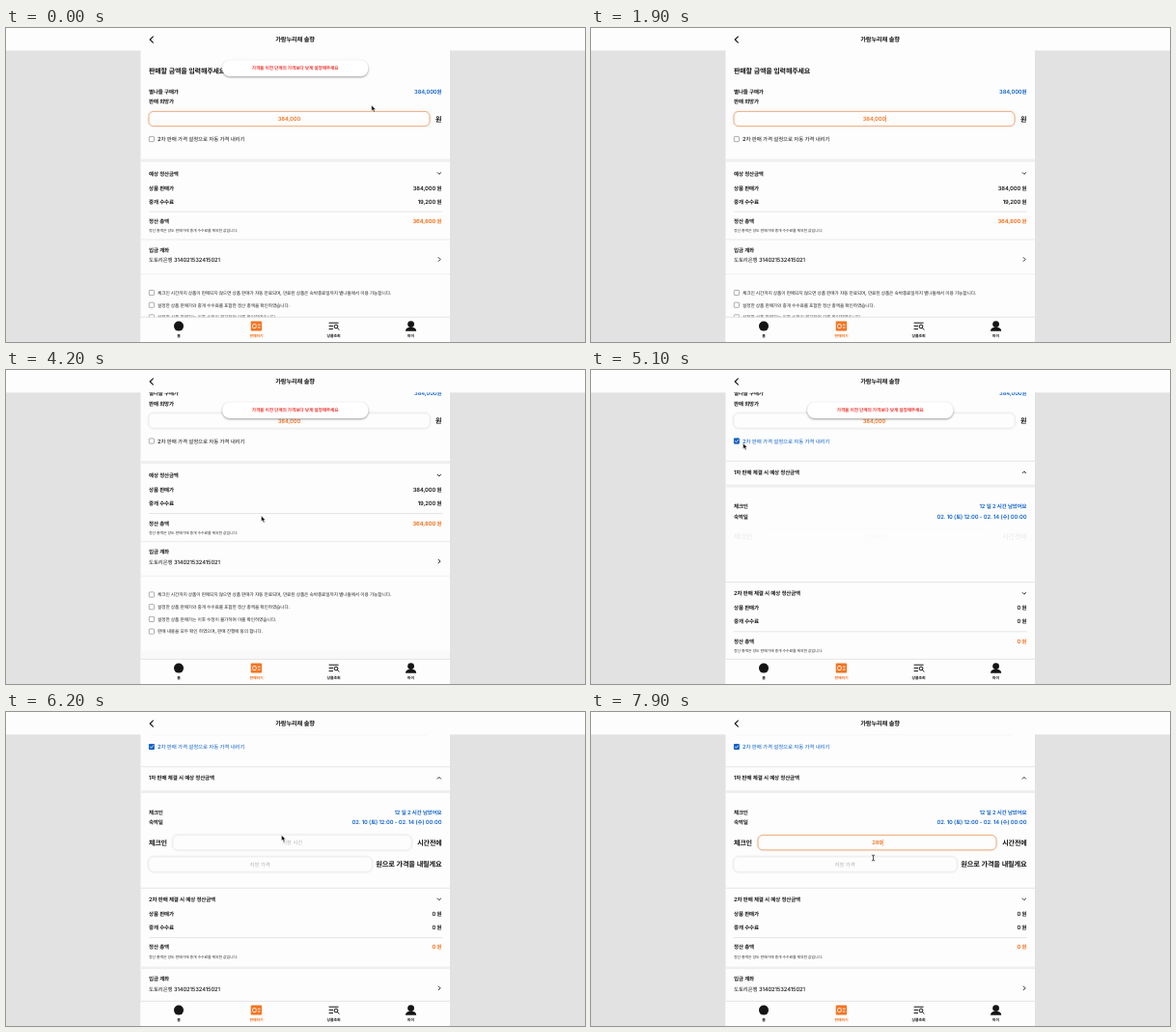
These frames come from a looping animation (600x325 px, 8 s). An HTML page:

```html
<!DOCTYPE html>
<html lang="ko">
<head>
<meta charset="utf-8">
<title>판매 금액 입력</title>
<style>
  html, body { margin: 0; width: 100%; height: 100%; overflow: hidden; background: #e2e2e2; }
  svg { display: block; width: 100vw; height: 100vh; }
  text {
    font-family: Inter, "Noto Sans CJK KR", "Noto Sans CJK", sans-serif;
    letter-spacing: -.02em; text-rendering: geometricPrecision; white-space: pre;
  }
  .ko { font-family: "Noto Sans CJK KR", "Noto Sans CJK", sans-serif; font-size: .94em; letter-spacing: -.026em; }
  .field { filter: drop-shadow(0 .5px 1px rgba(0, 0, 0, .13)); }
  .toast { filter: drop-shadow(.6px 1px 1.3px rgba(0, 0, 0, .38)); }
</style>
</head>
<body>
<svg id="stage" viewBox="0 0 600 325"></svg>
<script>
const LOOP = 8000;
const INK = '#151515', BLUE = '#0f62c8', ORANGE = '#f47421', PAPER = '#fdfdfd', HINT = '#b4b4b4';

// ---------- drawing helpers ----------
const text = (str, x, y, { size = 14, weight = 600, fill = INK, anchor = 'start', id = '' } = {}) => {
  const px = size * 5 / 12;
  const runs = str.replace(/[가-힣]+/g, run => `<tspan class="ko">${run}</tspan>`);
  return `<text id="${id}" x="${x}" y="${y + px * .36}" font-size="${px}" font-weight="${weight}"
    fill="${fill}" text-anchor="${anchor}">${runs}</text>`;
};
const right = (str, y, options) => text(str, 451.5, y, { anchor: 'end', ...options });
const center = (str, x, y, options) => text(str, x, y, { anchor: 'middle', ...options });
const rect = (x, y, w, h, fill, extra = '') =>
  `<rect x="${x}" y="${y}" width="${w}" height="${h}" fill="${fill}" ${extra}/>`;
const band = (y, h, fill = '#efefef') => rect(139.5, y, 320.5, h, fill);
const stroke = (d, width = 1, color = INK) =>
  `<path d="${d}" fill="none" stroke="${color}" stroke-width="${width}" stroke-linecap="round" stroke-linejoin="round"/>`;
const chevron = (y, flip = 1) => stroke(`M447.2 ${y - .8 * flip}l1.7 ${1.7 * flip}l1.7 ${-1.7 * flip}`, .9);
const field = (id, x, y, w) =>
  rect(x, y, w, 15.2, PAPER, `id="${id}" class="field" rx="5" stroke-width=".8"`);
const caret = id => rect(0, 0, .6, 7, ORANGE, `id="${id}"`);
const checkbox = y => rect(148.3, y - 2.6, 5.2, 5.2, '#fff', 'rx=".7" stroke="#777" stroke-width=".6"');

const summary = (y, title, price, fee, total) =>
  text(title, 148, y) + chevron(y) +
  text('상품 판매가', 148, y + 15) + right(price, y + 15) +
  text('중개 수수료', 148, y + 29) + right(fee, y + 29) +
  rect(148, y + 39.2, 304, .7, '#dcdcdc') +
  text('정산 총액', 148, y + 49.5) + right(total, y + 49.5, { fill: ORANGE, weight: 700 }) +
  text('정산 총액은 양도 판매가에 중개 수수료를 제외한 값입니다.', 148, y + 59.3, { size: 10, weight: 500, fill: '#333' });

const terms = [
  '체크인 시간까지 상품이 판매되지 않으면 상품 판매가 자동 만료되며, 만료된 상품은 숙박종료일까지 별나들에서 이용 가능합니다.',
  '설정한 상품 판매가와 중개 수수료를 포함한 정산 총액을 확인하였습니다.',
  '설정한 상품 판매가는 이후 수정이 불가하며 이를 확인하였습니다.',
  '판매 내용을 모두 확인 하였으며, 판매 진행에 동의 합니다.'
].map((term, i) => {
  const y = 274 + i * 12.7;
  return checkbox(y) + text(term, 157, y, { size: 12, weight: 500, fill: '#222' });
}).join('');

// ---------- scene ----------
const priceSection =
  text('판매할 금액을 입력해주세요', 148, 44, { size: 18 }) +
  text('별나들 구매가', 148, 65.5) + right('384,000원', 65.5, { fill: BLUE }) +
  text('판매 희망가', 148, 76) +
  field('priceField', 148, 86.4, 291) +
  center('384,000', 293.5, 94, { fill: ORANGE }) + caret('priceCaret') +
  text('원', 445, 94, { size: 18 }) +
  checkbox(115) +
  `<g id="checkMark">${rect(148, 112.1, 5.8, 5.8, BLUE, 'rx=".8"')}${stroke('M149.4 115l1.1 1.2l2-2.4', .8, '#fff')}</g>` +
  text('2차 판매 가격 설정으로 자동 가격 내리기', 157, 115, { weight: 500, id: 'autoLabel' });

const singleStage = band(135.5, 3.2) +
  summary(150.5, '예상 정산금액', '384,000 원', '19,200 원', '364,800 원') + band(218.3, 1.4);

const twoStages =
  band(135.4, .8, '#dedede') + text('1차 판매 체결 시 예상 정산금액', 148, 147.3) + chevron(147.3, -1) +
  band(160, 3) +
  text('체크인', 148, 182.4) + right('12 일 2 시간 남았어요', 182.4, { fill: BLUE }) +
  text('숙박일', 148, 193) + right('02. 10 (토) 12:00 - 02. 14 (수) 00:00', 193, { fill: BLUE }) +
  `<g id="timeRow">${text('체크인', 148, 214.2, { size: 18 })}${field('timeField', 173, 206.6, 247)}
    ${center('지정 시간', 296.5, 214.2, { weight: 400, fill: HINT, id: 'timeHint' })}
    ${center('', 296.5, 214.2, { fill: ORANGE, id: 'timeValue' })}${caret('timeCaret')}
    ${right('시간전에', 214.2, { size: 18 })}</g>` +
  `<g id="cutRow">${field('cutField', 148, 229, 231)}
    ${center('지정 가격', 263, 236.6, { weight: 400, fill: HINT })}
    ${right('원으로 가격을 내릴게요', 236.6, { size: 18.5 })}</g>` +
  band(260.8, .8, '#dedede') +
  summary(272.8, '2차 판매 체결 시 예상 정산금액', '0 원', '0 원', '0 원') + band(342.5, 2.6);

const account =
  text('입금 계좌', 148, 229.5) +
  text('도토리은행 314021532415021', 148, 240.3, { weight: 500 }) +
  stroke('M448.2 237.6l1.9 1.9l-1.9 1.9', .9) +
  band(254.2, 1) + terms + band(332, 40, '#f9f9f9');

const navLabel = (str, x, fill) => center(str, x, 318.2, { size: 10, fill });
const navBar =
  band(298.6, 1, '#f0f0f0') + band(299.4, .9, '#dfdfdf') + band(300, 25, PAPER) +
  `<circle cx="179" cy="308.6" r="5" fill="${INK}"/>` + navLabel('홈', 179) +
  rect(253.7, 303.6, 11.4, 10, ORANGE, 'rx="1"') +
  rect(255.6, 306.6, 3.6, 4, 'none', 'rx="1" stroke="#fff" stroke-width=".9"') +
  stroke('M261.2 307.2h2M261.2 310h2', .9, '#fff') + navLabel('판매하기', 259.4, ORANGE) +
  stroke('M335 305.2h9.2M335 308.4h3.6M335 311.6h3.6', 1) +
  `<circle cx="342" cy="309" r="1.9" fill="none" stroke="${INK}" stroke-width="1"/>` +
  stroke('M343.5 310.6l1.5 1.6', 1) + navLabel('상품조회', 339.6) +
  `<circle cx="419.6" cy="306.6" r="3.4" fill="${INK}"/>
   <path d="M414 313.8q0-4 5.6-4t5.6 4z" fill="${INK}"/>` + navLabel('마이', 419.6);

document.getElementById('stage').innerHTML =
  `<clipPath id="viewport"><rect x="139.5" y="23" width="320.5" height="277"/></clipPath>` +
  rect(0, 0, 600, 325, '#e2e2e2') + band(23, 302, PAPER) +
  `<g clip-path="url(#viewport)"><g id="page">${priceSection}
    <g id="single">${singleStage}</g><g id="staged">${twoStages}</g><g id="account">${account}</g></g></g>` +
  rect(0, 0, 600, 23.3, PAPER) + stroke('M152.4 8.8l-3.2 3.2l3.2 3.2', 1.1) +
  center('가람누리채 솔향', 299.6, 12, { size: 16 }) + navBar +
  `<g id="toast">${rect(224, 33.3, 151.5, 16.8, '#fff', 'rx="8" class="toast"')}
    ${center('가격을 이전 단계의 가격보다 낮게 설정해주세요', 299.6, 41.6, { size: 12, fill: '#f0342f' })}</g>` +
  `<path id="arrow" d="M0 0v5.8l1.4-1.2l1 2.3l1.1-.5l-1-2.2h1.8z" fill="#111" stroke="#fff" stroke-width=".4"/>
   <g id="beam">${stroke('M-1.2 -3q1.2 0 1.2 .9v4.2q0 .9-1.2 .9M1.2 -3q-1.2 0-1.2 .9M0 2.1q0 .9 1.2 .9', .7)}</g>`;

// ---------- motion ----------
const el = Object.fromEntries([...document.querySelectorAll('#stage [id]')].filter(n => n.id).map(n => [n.id, n]));
const clamp = v => Math.min(1, Math.max(0, v));
const smooth = v => v * v * (3 - 2 * v);
const ramp = (t, from, to) => smooth(clamp((t - from) / (to - from)));
const show = (node, on) => node.setAttribute('display', on ? 'inline' : 'none');
const move = (node, x, y) => node.setAttribute('transform', `translate(${x} ${y})`);

// Keys are [time, ...values]; values ease from one key to the next.
const track = (t, keys) => {
  const next = keys.findIndex(key => key[0] > t);
  if (next < 0) return keys.at(-1).slice(1);
  const a = keys[next - 1], b = keys[next], k = ramp(t, a[0], b[0]);
  return a.slice(1).map((v, i) => v + (b[i + 1] - v) * k);
};

const scrollKeys = [[0, 0], [3600, 0], [4150, 41.5], [5500, 41.5], [5600, 43], [6150, 79]];
const pointerKeys = [
  [0, 378.8, 80], [300, 374, 105], [700, 374, 105], [800, 360, 96], [1000, 360, 96], [1300, 292, 94],
  [2300, 334, 126], [2600, 334, 126], [3300, 291, 145.5], [3600, 291, 145.5], [4200, 264.5, 151],
  [4400, 264.5, 151], [4800, 150.5, 72], [5000, 150.5, 72], [5600, 244.3, 123.4], [6200, 285.5, 127.5],
  [6500, 296, 136], [7200, 296, 136], [7700, 292.5, 151]
];
const BLUR = 3400, CHECKED = 4900, TIME_FOCUS = 6600;

const setFocus = (node, on) => node.setAttribute('stroke', on ? '#f7995a' : '#efefef');
const setCaret = (node, on, x, y) => { show(node, on); move(node, x, y - 3.5); };

function render(t) {
  const [scroll] = track(t, scrollKeys);
  move(el.page, 0, -scroll);

  const staged = t >= CHECKED;
  show(el.single, !staged);
  show(el.staged, staged);
  show(el.checkMark, staged);
  el.autoLabel.setAttribute('fill', staged ? BLUE : INK);
  move(el.account, 0, staged ? 125.3 : 0);

  const cutIn = ramp(t, 5400, 5780);
  el.timeRow.setAttribute('opacity', ramp(t, 5050, 5400));
  el.cutRow.setAttribute('opacity', cutIn);
  move(el.cutRow, 2 * (cutIn - 1), 0);

  const blink = Math.floor(t / 500) % 2 === 1;
  setFocus(el.priceField, t < BLUR);
  setCaret(el.priceCaret, t < BLUR && blink, 305.3, 94);

  const focused = t >= TIME_FOCUS;
  const typed = '289'.slice(0, [7250, 7450, 7700].filter(key => t >= key).length);
  setFocus(el.timeField, focused);
  setFocus(el.cutField, false);
  show(el.timeHint, !typed);
  el.timeValue.textContent = typed;
  setCaret(el.timeCaret, focused && (blink || typed), 296.5 + typed.length * 1.8, 214.2);

  el.toast.setAttribute('opacity',
    t < 2500 ? 1 - ramp(t, 1500, 1800) : ramp(t, 3450, 3600) - ramp(t, 5200, 5450));

  const [x, y] = track(t, pointerKeys);
  const beam = t >= 750 && t < 1500 || t >= 6350;
  const hidden = t >= 1500 && t < 2400;
  show(el.arrow, !beam && !hidden);
  show(el.beam, beam);
  move(el.arrow, x, y);
  move(el.beam, x, y);
}

const start = performance.now();
function frame() {
  render((performance.now() - start) % LOOP);
  requestAnimationFrame(frame);
}
frame();
</script>
</body>
</html>
```
